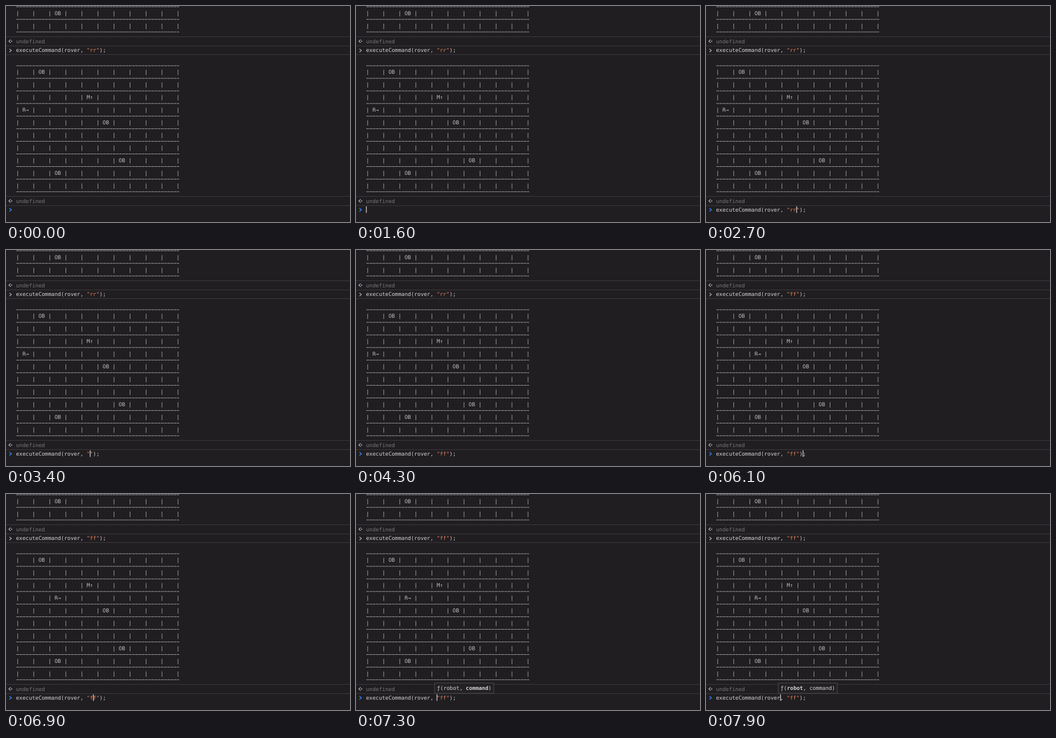
Animation of 600 by 376 pixels, one loop 8000 ms. Source, as an HTML page:

```html
<!DOCTYPE html>
<html lang="en">
<head>
<meta charset="utf-8">
<title>Rover console</title>
<style>
html, body { margin: 0; width: 100%; height: 100%; overflow: hidden; background: #201e21; }
svg { display: block; width: 600px; height: 376px; }
text {
  font: 9.3px "DejaVu Sans Mono", "Liberation Mono", monospace;
  fill: #d4d3d5;
  white-space: pre;
  text-rendering: geometricPrecision;
}
.grid text { fill: #bdbcbe; }
.dim { fill: #78777a; }
.str { fill: #e8825a; }
.bold { font-weight: bold; }
.rule { stroke: #3b393d; }
.dash { stroke: #aeadaf; stroke-width: .9; stroke-dasharray: 4.9 .7; }
.icon { fill: none; stroke: #a9a8ab; stroke-width: 1.3; }
.active { stroke: #2f80ea; stroke-width: 1.5; }
</style>
</head>
<body>
<svg id="stage" viewBox="0 0 600 376"></svg>
<script>
const LOOP = 8000, BLINK = 500;
const LEFT = 17.5, CHAR = 5.6, ROW = 21.93, CELLS = 10;

// Each key press: time, typed argument (null = empty prompt), caret column
const keys = [
  [-600, null, 0],
  [1900, "rr", 28], [2300, "rr", 27], [2500, "rr", 26], [2700, "rr", 25],
  [3100, "r", 24], [3300, "", 23], [3500, "f", 24], [3700, "ff", 25],
  [4400, null, 0],
  [5800, "ff", 28], [6000, "ff", 27], [6300, "ff", 26], [6500, "ff", 25],
  [6800, "ff", 24], [7100, "ff", 23], [7300, "ff", 22], [7500, "ff", 21],
  [7700, "ff", 20]
];
const ENTER = 4400;

const stage = document.getElementById("stage");

function add(tag, attrs, parent = stage) {
  const el = document.createElementNS("http://www.w3.org/2000/svg", tag);
  for (const name in attrs) el.setAttribute(name, attrs[name]);
  return parent.appendChild(el);
}

function label(y, content, cls = "", parent = stage) {
  const el = add("text", { x: LEFT, y, class: cls }, parent);
  el.textContent = content;
  return el;
}

function command(y) {
  const el = label(y, "");
  const parts = ["", "str", ""].map(cls => add("tspan", { class: cls }, el));
  return arg => {
    const empty = arg === null;
    parts[0].textContent = empty ? "" : "executeCommand(rover, ";
    parts[1].textContent = empty ? "" : `"${arg}"`;
    parts[2].textContent = empty ? "" : ");";
  };
}

const rule = y => add("line", { x1: 0, x2: 600, y1: y, y2: y, class: "rule" });
const dash = (y, parent) =>
  add("line", { x1: 18, x2: 302, y1: y, y2: y, class: "dash" }, parent);

function rowText(marks = {}) {
  let line = "|";
  for (let i = 0; i < CELLS; i++) line += ` ${marks[i] || "  "} |`;
  return line;
}

// Draws rows below a first dashed line; returns the text elements
function grid(top, rows) {
  const g = add("g", { class: "grid" });
  dash(top, g);
  return rows.map((marks, i) => {
    dash(top + (i + 1) * ROW, g);
    return label(top + 14.3 + i * ROW, rowText(marks), "", g);
  });
}

const chevron = (y, cls) =>
  add("path", { d: `M6 ${y - 2.8}l3.4 2.8l-3.4 2.8`, class: "icon " + cls });

function result(y) {
  add("path", { d: `M8.3 ${y - 2.8}l-3.3 2.8l3.3 2.8`, class: "icon" });
  add("circle", { cx: 9.9, cy: y, r: 1.1, fill: "#a9a8ab" });
  label(y + 3.2, "undefined", "dim");
}

grid(1.3, [{ 2: "OB" }, {}]);
const rows = grid(104, [
  { 1: "OB" }, {}, { 4: "M↑" }, {}, { 5: "OB" },
  {}, {}, { 6: "OB" }, { 2: "OB" }, {}
]);
[53.5, 69.5, 84.5, 331.5, 347.5].forEach(rule);
result(61.3);
result(339.4);
chevron(77.5, "");
chevron(354.8, "active");
const setHistory = command(80.2);
const setPrompt = command(357.7);
const caret = add("rect", { y: 348.7, width: 1.1, height: 11.4, fill: "#f0eff1" });

const tip = add("g", {});
add("rect", { x: 126, y: 329, width: 103, height: 18, fill: "#232124", stroke: "#4b494d" }, tip);
const tipText = add("text", { x: 130, y: 341 }, tip);
const [, robot, , param] = ["ƒ(", "robot", ", ", "command", ")"].map(word => {
  const span = add("tspan", {}, tipText);
  span.textContent = word;
  return span;
});

function draw(t) {
  const [since, arg, col] = keys.findLast(key => key[0] <= t);
  const done = t >= ENTER;
  setHistory(done ? "ff" : "rr");
  rows[3].textContent = rowText({ [done ? 2 : 0]: "R→" });
  setPrompt(arg);

  caret.setAttribute("x", LEFT + col * CHAR);
  const lit = Math.floor((t - since) / BLINK) % 2 === 0;
  caret.setAttribute("visibility", lit ? "visible" : "hidden");

  const hint = col >= 20 && col <= 22;
  tip.setAttribute("visibility", hint ? "visible" : "hidden");
  tip.setAttribute("transform", `translate(${(col - 20) * CHAR} 0)`);
  robot.setAttribute("class", col === 20 ? "bold" : "");
  param.setAttribute("class", col > 20 ? "bold" : "");
}

const start = performance.now();
function tick() {
  draw((performance.now() - start) % LOOP);
  requestAnimationFrame(tick);
}
tick();
</script>
</body>
</html>
```
